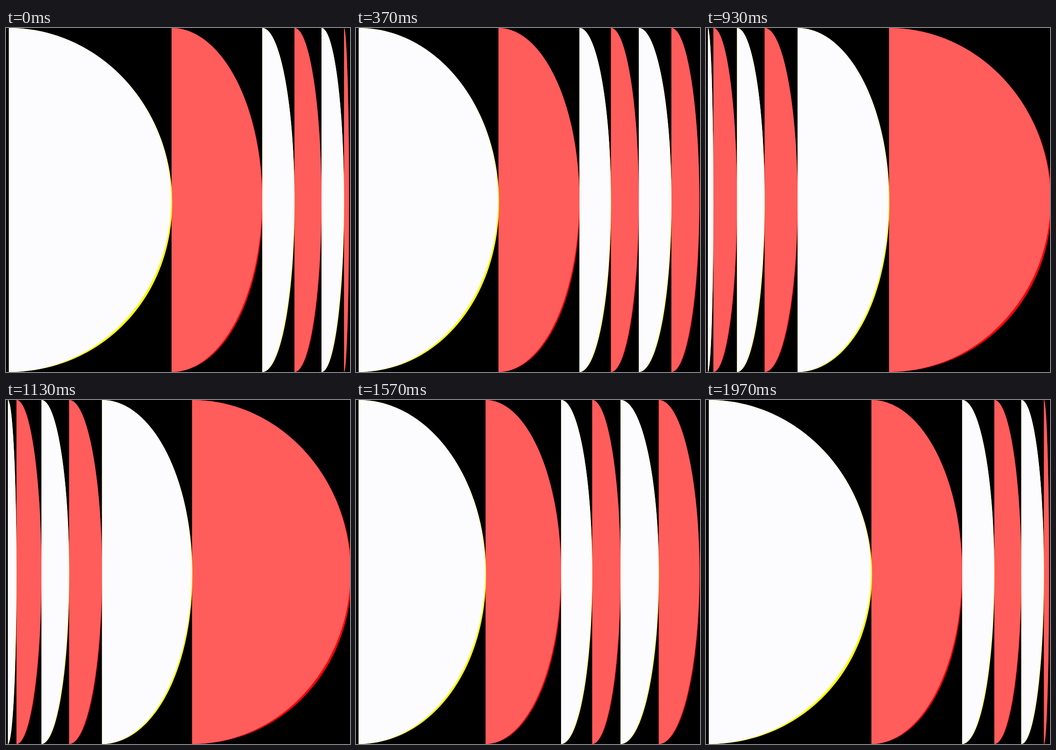
An HTML page that plays this animation: 748x748 px, repeating every 2000 ms.

```html
<!DOCTYPE html>
<html lang="en">
<head>
<meta charset="utf-8">
<title>Sliding half discs</title>
<style>
  html, body { margin: 0; width: 100%; height: 100%; overflow: hidden; background: #000; }
  svg { display: block; width: 100%; height: 100%; }
  .white { fill: #fcfcfe; color: #ff0; }
  .red { fill: #ff5c5c; color: #f00; }
</style>
</head>
<body>
<svg viewBox="0 0 748 748">
  <defs>
    <!-- Half disc in a unit box, with a coloured rim at the lower right -->
    <g id="disc">
      <path fill="currentColor" d="M0 0C.552 0 1.004 .227 1.004 .507C1.004 .7855 .567 1 0 1z"/>
      <path d="M0 0C.551 0 .998 .224 .998 .5S.551 1 0 1z"/>
    </g>
  </defs>
  <g id="reds"></g>
  <g id="whites"></g>
</svg>
<script>
  const LOOP = 2000, STEPS = 60, HALF = STEPS / 2, HEIGHT = 748;

  // Edges between neighbouring discs at both ends of the swing
  const START = [6.2, 360, 557.3, 627.3, 686, 735, 746];
  const END = [4, 14, 64.5, 124.5, 196.3, 396, 750];

  const discs = START.slice(1).map((_, i) => {
    const kind = i % 2 ? 'red' : 'white';
    const use = document.createElementNS('http://www.w3.org/2000/svg', 'use');
    use.setAttribute('href', '#disc');
    use.setAttribute('class', kind);
    document.getElementById(kind + 's').append(use);
    return use;
  });

  // cubic-bezier(x1, 0, x2, 1)
  function ease(x, x1, x2) {
    let lo = 0, hi = 1;
    for (let i = 0; i < 30; i++) {
      const s = (lo + hi) / 2, r = 1 - s;
      if (3 * s * r * (x1 * r + x2 * s) + s ** 3 < x) lo = s;
      else hi = s;
    }
    return lo * lo * (3 - 2 * lo);
  }

  // Swing to END, then back to START
  function swing(step) {
    const u = step / HALF;
    return u < 1 ? ease(u, 0.698, 0.477) : 1 - ease(u - 1, 0.536, 0.293);
  }

  function draw(now) {
    // 30 steps a second, each starting on a whole hundredth
    const hundredths = Math.floor((now % LOOP) / 10 + 1e-6);
    const step = Math.floor(hundredths * 0.3 + 0.15) % STEPS;
    const p = swing(step);
    const edges = START.map((a, i) => a + (END[i] - a) * p);
    discs.forEach((disc, i) => {
      const width = edges[i + 1] - edges[i];
      disc.setAttribute('transform', `translate(${edges[i]} 0) scale(${width} ${HEIGHT})`);
    });
  }

  const origin = performance.now();
  function tick() {
    draw(performance.now() - origin);
    requestAnimationFrame(tick);
  }
  tick();
</script>
</body>
</html>
```
